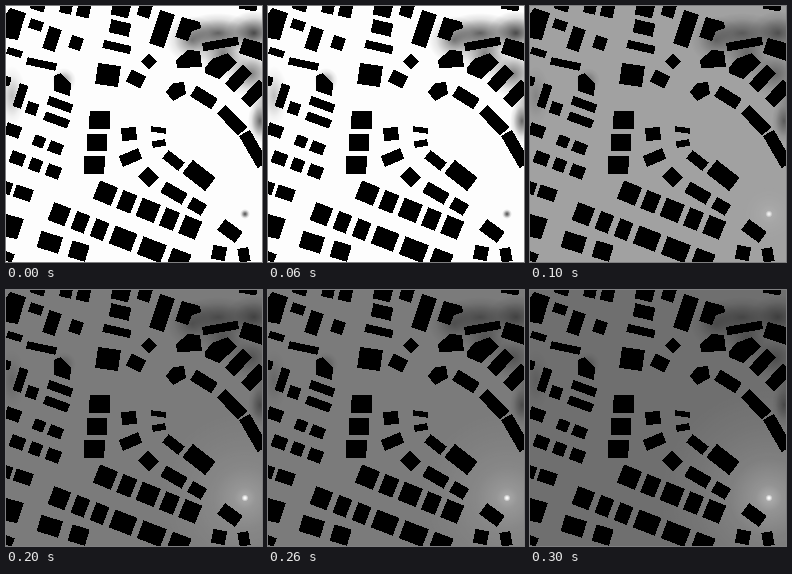
An HTML page for the animation above (400 ms loop, 256 by 256 pixels).

```html
<!DOCTYPE html>
<html lang="en">
<head>
<meta charset="utf-8">
<title>Spread through a town plan</title>
<style>
  html, body { margin: 0; width: 100%; height: 100%; overflow: hidden; background: #000; }
  svg { display: block; width: 100%; height: 100%; }
  #ground, #shade, #halo, #spot, #dot { animation: 400ms step-end infinite; }
  #ground { animation-name: ground; }
  #shade { animation-name: shade; }
  #halo { animation-name: halo; transform-origin: 239px 208px; }
  #spot { animation-name: spot; }
  #dot { animation-name: dot; }
  @keyframes ground {
    0% { fill: #fdfdfd; } 25% { fill: #a1a1a1; } 50% { fill: #7b7b7b; } 75% { fill: #6f6f6f; }
  }
  @keyframes shade {
    0% { opacity: 1; } 25% { opacity: .72; } 50% { opacity: .66; } 75% { opacity: .62; }
  }
  @keyframes halo {
    0% { opacity: 0; transform: scale(.2); }
    25% { opacity: .35; transform: scale(.25); }
    50% { opacity: .6; transform: scale(.8); }
    75% { opacity: .75; transform: scale(1); }
  }
  @keyframes spot { 0% { opacity: 0; } 25% { opacity: .85; } 50%, 75% { opacity: 1; } }
  @keyframes dot { 0% { opacity: 1; } 25%, 100% { opacity: 0; } }
</style>
</head>
<body>
<svg viewBox="0 0 256 256" preserveAspectRatio="none">
  <defs>
    <radialGradient id="dark">
      <stop offset="0" stop-opacity="1"/>
      <stop offset=".4" stop-opacity=".55"/>
      <stop offset=".7" stop-opacity=".18"/>
      <stop offset="1" stop-opacity="0"/>
    </radialGradient>
    <radialGradient id="light">
      <stop offset="0" stop-color="#fff" stop-opacity=".6"/>
      <stop offset=".12" stop-color="#fff" stop-opacity=".34"/>
      <stop offset=".35" stop-color="#fff" stop-opacity=".16"/>
      <stop offset=".65" stop-color="#fff" stop-opacity=".07"/>
      <stop offset="1" stop-color="#fff" stop-opacity="0"/>
    </radialGradient>
    <radialGradient id="core">
      <stop offset="0" stop-color="#fff"/>
      <stop offset=".3" stop-color="#fff" stop-opacity=".9"/>
      <stop offset="1" stop-color="#fff" stop-opacity="0"/>
    </radialGradient>
  </defs>
  <rect id="ground" width="256" height="256"/>
  <g id="shade" fill="url(#dark)"></g>
  <circle id="halo" cx="239" cy="208" r="110" fill="url(#light)"/>
  <circle id="spot" cx="239" cy="208" r="3.6" fill="url(#core)"/>
  <circle id="dot" cx="239" cy="208" r="5" fill="url(#dark)" fill-opacity=".7"/>
  <g id="town" shape-rendering="crispEdges">
    <!-- Houses that are not rectangles -->
    <path d="M4 2 20 7 16 20 12 34 0 32V8zM48 70 55 67 65 78 64 90 48 85z"/>
    <path d="M0 208 18 213 11 233 0 231zM176 11 194 16 195 22 186 25 182 35 169 31z"/>
    <path d="M170 54 182 44 194 45 196 61 171 62zM160 86 167 77 178 76 180 88 167 95z"/>
    <path d="M238 32 256 37V55L233 47zM199 62 206 53 222 47 231 57 213 73 199 67z"/>
  </g>
</svg>
<script>
  const town = document.getElementById('town');
  const shade = document.getElementById('shade');
  const rad = degrees => degrees * Math.PI / 180;

  function add(parent, tag, attrs) {
    const node = document.createElementNS('http://www.w3.org/2000/svg', tag);
    for (const key in attrs) node.setAttribute(key, attrs[key]);
    parent.append(node);
  }

  function house(cx, cy, width, height, angle = 18) {
    add(town, 'rect', {
      x: cx - width / 2, y: cy - height / 2, width, height,
      transform: `rotate(${angle} ${cx} ${cy})`
    });
  }

  // Houses side by side along a straight street, starting at x, y.
  function terrace(x, y, angle, gap, depth, ...widths) {
    let along = 0;
    for (const width of widths) {
      const middle = along + width / 2;
      house(x + middle * Math.cos(rad(angle)), y + middle * Math.sin(rad(angle)), width, depth, angle);
      along += width + gap;
    }
  }

  // A point on a circle around the centre of the crescent, clockwise from north.
  const crescent = (radius, angle) =>
    [119.5 + radius * Math.sin(rad(angle)), 217 - radius * Math.cos(rad(angle))];

  function shadow(cx, cy, rx, ry, opacity) {
    add(shade, 'ellipse', { cx, cy, rx, ry, opacity });
  }

  // South
  terrace(90.4, 183.5, 22, 5.8, 19.5, 19.5, 15, 19.5, 15, 18);
  terrace(45, 205, 21, 6.5, 19, 18, 14, 14, 23.5, 25, 20);
  terrace(33, 233, 17, 10, 17, 22.5, 18);
  terrace(157.4, 180.9, 30, 6.3, 12.5, 24.5, 16);
  terrace(-5, 248, 21, 25, 9, 13, 15);

  // West
  terrace(27.7, 133.4, 21, 5, 11, 11.5, 14);
  terrace(4.7, 150, 20, 6, 12.5, 14.5, 12, 14);
  terrace(-3.3, 180.6, 18, 3.6, 12.5, 9, 18);
  house(7, 124.5, 15.5, 12, 20);
  house(14.5, 90, 9, 24);
  house(26, 102.5, 11.5, 12);
  house(1, 75, 7, 9);
  for (let i = 0; i < 2; i++) house(54 - 3.5 * i, 98.5 + 15.5 * i, 25.5, 9, 20);

  // North
  for (let i = 0; i < 3; i++) {
    const i2 = i * i;
    house(115 - i2, 3 + 19 * i, 18 + 2.5 * i2, 15 - 1.7 * i2, 13);
  }
  terrace(54.5, -.2, 12, 5, 13, 12, 13);
  house(32, 0, 14, 9);
  house(30, 19, 13.5, 10);
  house(46, 33, 13, 23);
  house(70, 37, 12.5, 13);
  house(8.5, 46.5, 15.5, 7);
  house(35.5, 58, 30, 7.5, 12);
  house(102, 69, 23, 21, 8);
  house(130, 73, 16, 13.5, 25);
  house(139, 3.5, 13, 15);
  house(156, 23, 15.5, 35);
  house(143, 55.5, 12, 11.5, 45);

  // Crescent and the houses behind it
  for (let i = 0; i < 3; i++) {
    const angle = 32 + 14 * i;
    house(...crescent(148, angle), 25 + 6 * i, 12.5, angle);
  }
  terrace(227.7, 68, 43, 9, 26, 13, 13);
  house(214.5, 38, 36, 8.5, -10);
  house(242, 0, 18, 8, 10);

  // Centre
  for (let i = 0; i < 3; i++) house(93.7 - 2.7 * i, 114 + 22.5 * i, 20.5, 17.5, 1);
  house(123, 128, 15, 13, -4);
  house(152.5, 124, 15, 5.5, 8);
  house(153, 137.5, 13.5, 6.5, -10);
  house(124.5, 151.5, 21, 11.5, -23);
  house(142.5, 171, 15.5, 14.5, 45);
  house(167.5, 154.5, 20.5, 10.5, 38);
  house(193, 169.5, 29, 17, 38);

  // South-east
  house(224, 225, 22, 13.5, 36);
  house(213, 247, 14, 14, 10);
  house(238, 249, 11, 14, -10);

  // Sheltered places stay dark: behind the crescent, and in narrow western yards.
  for (let angle = 20; angle <= 50; angle += 10) shadow(...crescent(195, angle), 26, 24, .5);
  shadow(212, 27, 40, 20, .6);
  shadow(248, 27, 28, 22, .7);
  shadow(254, 115, 12, 22, .6);
  shadow(58, 74, 12, 12, .4);
  shadow(6, 90, 14, 30, .25);
</script>
</body>
</html>
```
